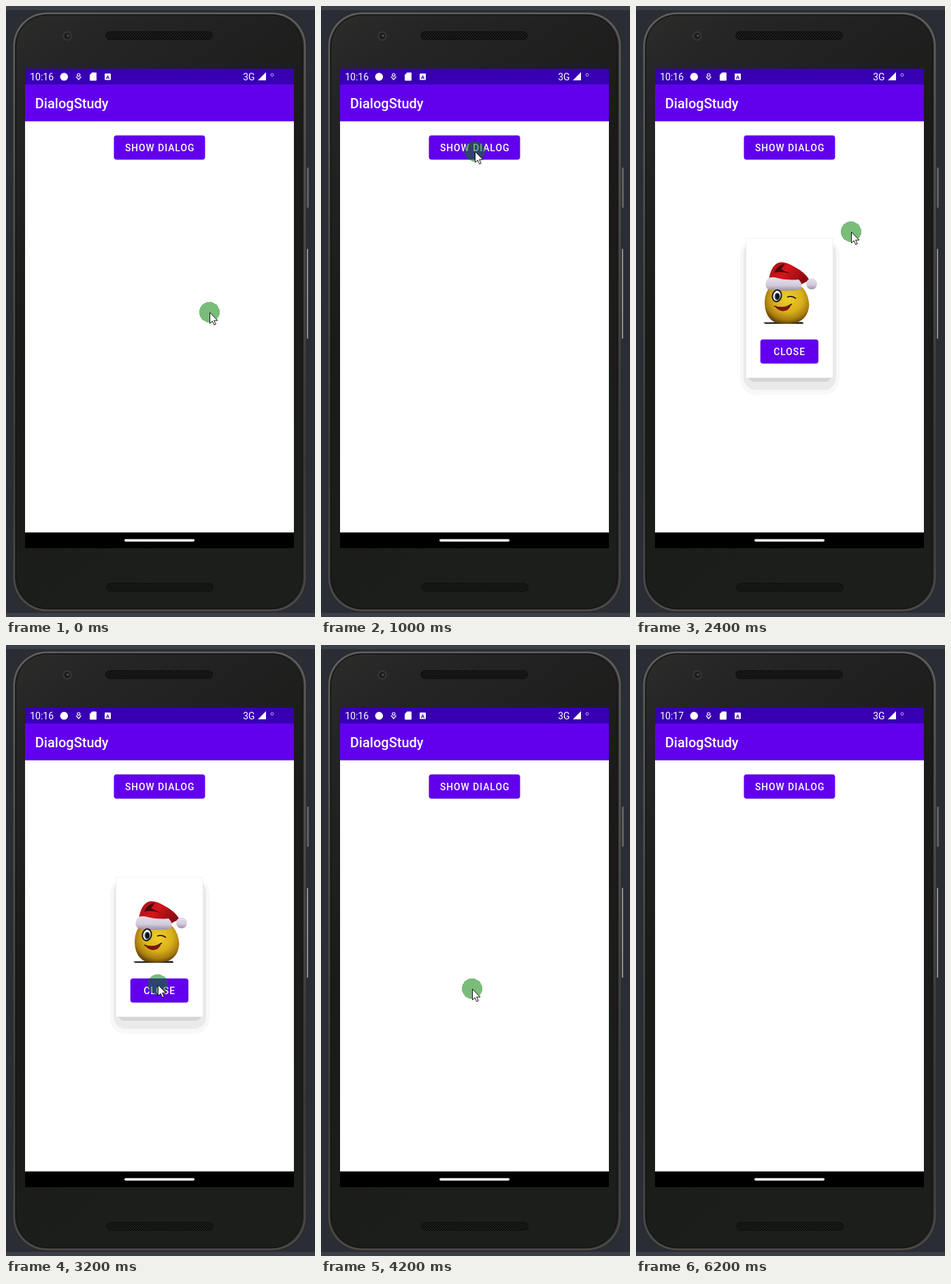
Animation, 454 px wide and 896 px high, one loop 7000 ms. Source, as an HTML page:

```html
<!DOCTYPE html>
<html lang="en">
<head>
<meta charset="utf-8">
<title>Dialog demo</title>
<style>
  html, body { margin: 0; width: 100%; height: 100%; overflow: hidden; background: #2b2d34; }
  svg { display: block; width: 454px; height: 896px; font-family: Roboto, sans-serif; fill: #fff; }
  .label { font-size: 13.8px; font-weight: 500; letter-spacing: 1px; }
</style>
</head>
<body>
<svg viewBox="0 0 454 896">
  <defs>
    <linearGradient id="rim" x1="0" y1="0" x2="0" y2="1">
      <stop offset="0" stop-color="#5f5f5d"/>
      <stop offset=".4" stop-color="#4b4b4a"/>
      <stop offset=".75" stop-color="#3a3a39"/>
      <stop offset="1" stop-color="#4c4c4a"/>
    </linearGradient>
    <linearGradient id="body" x1="0" y1="0" x2=".35" y2="1">
      <stop offset="0" stop-color="#2c2c2b"/>
      <stop offset=".12" stop-color="#242524"/>
      <stop offset=".5" stop-color="#1a1b19"/>
      <stop offset="1" stop-color="#1c1e1b"/>
    </linearGradient>
    <pattern id="mesh" width="4" height="4" patternUnits="userSpaceOnUse">
      <rect width="4" height="4" fill="#1d1d1d"/>
      <circle cx="1" cy="1" r="1" fill="#070707"/>
      <circle cx="3" cy="3" r="1" fill="#070707"/>
    </pattern>
    <radialGradient id="glow" gradientUnits="userSpaceOnUse" cx="226" cy="208" r="70">
      <stop offset="0" stop-color="#fff" stop-opacity=".22"/>
      <stop offset=".6" stop-color="#fff" stop-opacity=".18"/>
      <stop offset=".85" stop-color="#fff" stop-opacity=".06"/>
      <stop offset="1" stop-color="#fff" stop-opacity="0"/>
    </radialGradient>
    <radialGradient id="skin" cx=".52" cy=".4" r=".6">
      <stop offset="0" stop-color="#f0cf2c"/>
      <stop offset=".55" stop-color="#d9b01a"/>
      <stop offset=".85" stop-color="#a87c10"/>
      <stop offset="1" stop-color="#6b4a0a"/>
    </radialGradient>
    <linearGradient id="felt" x1="0" y1="0" x2="1" y2=".4">
      <stop offset="0" stop-color="#a30d12"/>
      <stop offset=".5" stop-color="#d5161b"/>
      <stop offset="1" stop-color="#8d0b10"/>
    </linearGradient>
    <linearGradient id="fur" x1="0" y1="0" x2="0" y2="1">
      <stop offset="0" stop-color="#e6e0ec"/>
      <stop offset=".6" stop-color="#d3cadc"/>
      <stop offset="1" stop-color="#9c8fa6"/>
    </linearGradient>
  </defs>

  <!-- desktop and phone -->
  <rect width="454" height="896" fill="#2b2d34"/>
  <path d="M0 0H454V6H0ZM0 890H454V896H0Z" fill="#3c3f46"/>
  <rect x="442" y="237" width="3" height="59" rx="1" fill="#5e5f62"/>
  <rect x="442" y="356" width="2" height="132" rx="1" fill="#8e8e90"/>
  <rect x="9.5" y="8.5" width="432" height="880" rx="50" fill="#292929"/>
  <rect x="10.5" y="9.5" width="430" height="878" rx="49" fill="url(#rim)"/>
  <rect x="13" y="12" width="425" height="873" rx="47" fill="#2f2f2e"/>
  <rect x="14.5" y="13" width="421" height="871" rx="46" fill="url(#body)" stroke="#0e0e0e"/>
  <circle cx="90" cy="44" r="7" fill="#353535"/>
  <circle cx="90" cy="44" r="4.5" fill="#1b1c1c"/>
  <circle cx="91" cy="43.5" r="1.7" fill="#4c4f50"/>
  <g fill="url(#mesh)" stroke="#101010">
    <rect x="146.5" y="37.5" width="157" height="12" rx="6"/>
    <rect x="147.5" y="846.5" width="157" height="12" rx="6"/>
  </g>

  <!-- screen -->
  <rect x="28" y="92" width="395" height="703" fill="#000"/>
  <rect x="28" y="169" width="395" height="603"/>
  <rect x="28" y="92" width="395" height="23" fill="#3700b3"/>
  <rect x="28" y="115" width="395" height="54" fill="#6200ee"/>
  <rect x="28" y="169" width="395" height="1" fill="#000" opacity=".12"/>
  <rect x="174" y="781.8" width="103" height="3.6" rx="1.8" fill="#f4f4f4"/>
  <text id="clock" x="35.2" y="109" font-size="14">10:16</text>
  <text x="348.2" y="108.5" font-size="14">3G</text>
  <circle cx="85.3" cy="103.8" r="5.8"/>
  <g fill="none" stroke="#fff" stroke-width="1.2">
    <circle cx="106.7" cy="101" r="2"/>
    <path d="M103 103.5L106.7 108L110.4 103.5"/>
    <circle cx="391" cy="101" r="2" stroke-width=".8" opacity=".8"/>
  </g>
  <path d="M126.5 97.5H132Q133 97.5 133 98.5V108.5Q133 109.5 132 109.5H124Q123 109.5 123 108.5V101ZM382 97V109H370Z"/>
  <rect x="145" y="99" width="9" height="9.5" rx="1"/>
  <text x="149.5" y="106.7" font-size="8" font-weight="700" text-anchor="middle" fill="#3700b3">A</text>
  <text x="42.8" y="150" font-size="20" font-weight="500">DialogStudy</text>

  <rect x="159" y="191" width="133" height="35" rx="4" fill="#000" opacity=".15"/>
  <rect x="158.5" y="189.7" width="134" height="35.5" rx="4" fill="#6200ee"/>
  <rect id="ripple" x="158.5" y="189.7" width="134" height="35.5" rx="4" fill="url(#glow)"/>
  <text class="label" x="174.9" y="212.8">SHOW DIALOG</text>

  <g id="dialog">
    <g id="shadow">
      <rect x="153" y="343" width="146" height="227" rx="22" fill="#f8f8f8"/>
      <rect x="158" y="345" width="136" height="218" rx="18" fill="#eaeaea"/>
      <rect x="163" y="355" width="126" height="196" rx="12" fill="#d5d5d5"/>
    </g>
    <g id="card">
      <rect x="161.5" y="340.5" width="128" height="205" rx="1" fill="#e9e9e9"/>
      <rect x="162" y="341" width="127" height="204" rx="1"/>
      <!-- winking ball with a winter hat -->
      <path d="M187 464L245 463.5L246 466L190 466Z" fill="#1c1a1a"/>
      <path d="M189 434Q190 404 222 404Q252 406 254.5 438Q253 459 235 464.5Q220 467 204 464Q189 456 189 434Z" fill="url(#skin)"/>
      <path d="M195 402Q198 382 208 377Q217 373 232 382Q248 390 255 402L243 408Z" fill="url(#felt)"/>
      <path d="M203 391Q207 380 219 378L213 386L228 393Q214 388 203 391Z" fill="#4a080c"/>
      <path d="M191 405Q193 396 204 398Q222 403 239 401Q246 408 242 416Q222 419 194 416Q189 411 191 405Z" fill="url(#fur)"/>
      <circle cx="258" cy="407.5" r="8" fill="url(#fur)"/>
      <ellipse cx="207" cy="425" rx="6.5" ry="8.5" stroke="#17150f" stroke-width="2" transform="rotate(12 207 425)"/>
      <ellipse cx="207.5" cy="426" rx="4" ry="5.5" fill="#35566f"/>
      <ellipse cx="208" cy="426" rx="2.6" ry="4" fill="#080c12"/>
      <path d="M222 427Q229 424 235 429M203 440Q216 446 229 437" fill="none" stroke="#2a1c08" stroke-width="1.8"/>
      <path d="M204 440Q217 444 228 438Q225 447 216 447.5Q208 447 204 440Z" fill="#7d1713"/>
      <rect x="183" y="490" width="85" height="35" rx="4" fill="#000" opacity=".15"/>
      <rect x="182.7" y="488.9" width="85.3" height="35.3" rx="4" fill="#6200ee"/>
      <text class="label" x="202.3" y="512">CLOSE</text>
    </g>
  </g>

  <g id="pointer">
    <circle r="15" fill="#008000" fill-opacity=".52" shape-rendering="crispEdges"/>
    <path d="M.5 .5V16.5L4.2 13.2L6.8 18.8L9.2 17.7L6.7 12.2H11.8Z" stroke="#111"/>
  </g>
</svg>
<script>
const LOOP = 7000, STEP = 200;
const el = id => document.getElementById(id);

// [time, x, y]
const path = [
  [0, 299, 449], [200, 296, 436], [400, 279, 376], [600, 252, 287], [800, 232, 228], [1000, 226, 213],
  [2000, 226, 213], [2200, 270, 250], [2400, 316, 331], [2600, 333, 468],
  [2800, 300, 544], [3000, 245, 526], [3200, 223, 498], [3400, 222, 502], [3600, 222, 504],
  [5000, 222, 504], [5200, 218, 516], [5400, 201, 565], [5600, 165, 660],
  [5800, 120, 775], [6000, 82, 872], [6200, 70, 930], [LOOP, 70, 930]
];
// [time, value]
const dialogAlpha = [[0, 0], [1600, 0], [1800, .7], [2000, 1], [3800, 1], [4000, .45], [4200, 0], [LOOP, 0]];
const rippleAlpha = [[0, 0], [1400, 0], [1600, .5], [1800, 1], [2000, .4], [2200, 0], [LOOP, 0]];

function at(keys, t) {
  const i = keys.findIndex(k => k[0] > t);
  const [a, b] = [keys[i - 1], keys[i]];
  const p = (t - a[0]) / (b[0] - a[0]);
  return a.slice(1).map((v, n) => v + (b[n + 1] - v) * p);
}

function draw(now) {
  // the screen refreshes five times a second
  const t = Math.floor(now % LOOP / STEP) * STEP;
  const [x, y] = at(path, t);
  const [alpha] = at(dialogAlpha, t);
  el('pointer').setAttribute('transform', `translate(${x} ${y})`);
  el('dialog').setAttribute('opacity', alpha);
  el('card').setAttribute('transform', `translate(0 ${alpha < 1 ? 6 : 0})`);
  el('shadow').setAttribute('transform', `translate(0 ${alpha < 1 ? 2 : 0})`);
  el('ripple').setAttribute('opacity', at(rippleAlpha, t)[0]);
  el('clock').textContent = t < 4800 ? '10:16' : '10:17';
}

const start = performance.now();
function tick() {
  draw(performance.now() - start);
  requestAnimationFrame(tick);
}
tick();
</script>
</body>
</html>
```
